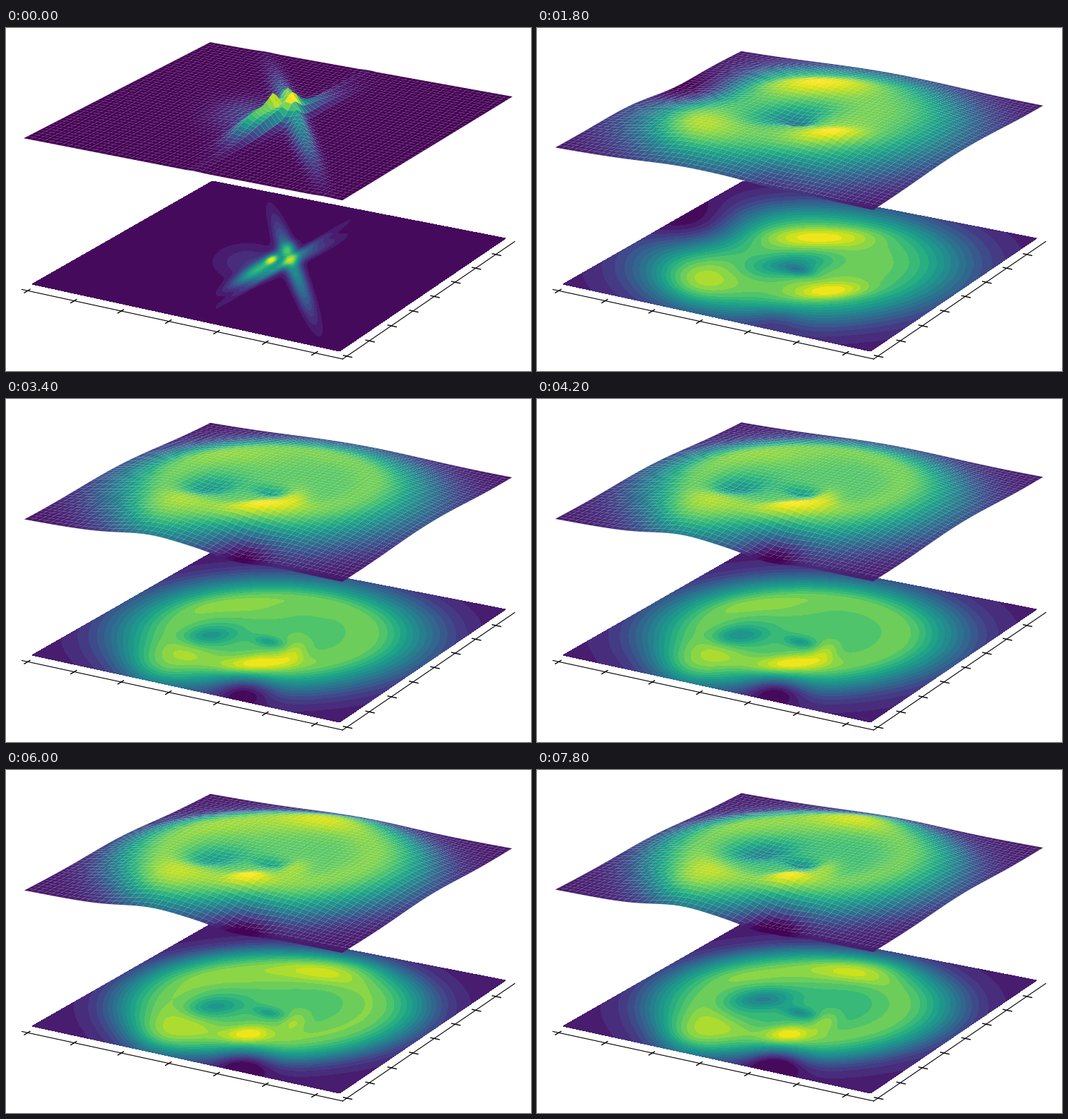
These frames come from a looping animation (743 by 486 pixels, 8000 ms). A matplotlib script:

```python
import numpy as np
import matplotlib.pyplot as plt
from matplotlib.animation import FuncAnimation
from matplotlib.collections import PolyCollection

W, H, DPI = 743, 486, 100
FRAMES, STEP = 40, 200
CELLS = 50          # surface facets per side
FINE = 2            # contour samples per facet
LIFT = 0.17         # surface relief as a share of the gap between planes

# corners in pixels: left, front, right, back
TOP = [(25, 155), (476, 243), (717, 96), (289, 19)]
FLOOR = [(37, 363), (472, 458), (707, 298), (292, 217)]


def project(corners, s, t):
    """Perspective map of the unit square onto four corners."""
    rows, rhs = [], []
    for (u, v), (x, y) in zip([(0, 0), (1, 0), (1, 1), (0, 1)], corners):
        rows.append([u, v, 1, 0, 0, 0, -u * x, -v * x])
        rows.append([0, 0, 0, u, v, 1, -u * y, -v * y])
        rhs += [x, y]
    a, b, c, d, e, f, g, h = np.linalg.solve(np.array(rows, float), rhs)
    w = g * s + h * t + 1
    return np.stack([(a * s + b * t + c) / w, (d * s + e * t + f) / w], -1)


side = np.linspace(0, 1, CELLS * FINE + 1)
S, T = np.meshgrid(side, side, indexing="ij")
R = np.hypot(S - 0.5, T - 0.5)
floor = project(FLOOR, S, T)
X, Y = floor[..., 0], floor[..., 1]
roof = project(TOP, S, T)
up = roof - floor


def bump(cx, cy, rx, ry, angle=0):
    """Gaussian hill, placed in pixels on the lower plane."""
    a = np.radians(angle)
    dx, dy = X - cx, Y - cy
    u = (dx * np.cos(a) + dy * np.sin(a)) / rx
    v = (dy * np.cos(a) - dx * np.sin(a)) / ry
    return np.exp(-u * u - v * v)


def unit(z):
    z = np.maximum(z, 0)
    return (z - z.min()) / (z.max() - z.min())


def ramp(ms, start, end):
    w = np.clip((ms - start) / (end - start), 0, 1)
    return w * w * (3 - 2 * w)


def crossed_ridges():
    """Narrow beams that meet at one hub, over a dim glow."""
    z = 0.42 * bump(408, 342, 68, 11, 69)
    z += 0.28 * bump(400, 331, 68, 8, -25)
    z += 0.16 * bump(391, 335, 105, 4, -33)
    z += 0.45 * bump(358, 340, 42, 8, -32)
    z += 0.50 * bump(376, 328, 9, 5, -30)
    z += 0.20 * bump(399, 312, 10, 9)
    return unit(z + 0.13 * bump(342, 332, 48, 26))


def disc(ms):
    """Round plateau whose rim sharpens while bars and hollows drift."""
    late = ramp(ms, 1600, 3400)
    early = 1 - late
    level = np.interp(ms, [1200, 3400, 5000, 6000, 7800],
                      [0.85, 0.75, 0.6, 0.76, 0.58])
    soft = np.interp(ms, [1200, 6000], [0.085, 0.045])
    z = 0.07 + level / (1 + np.exp((R - 0.43 - 0.015 * late) / soft))
    z += 0.1 * late * np.exp(-((R - 0.29) / 0.07) ** 2)

    # lobe at the near left, dent behind it, pit at the near edge
    z += (0.23 + 0.05 * late) * bump(225 - 8 * late, 360 + 22 * late, 55, 32)
    z -= 0.4 * early * bump(235, 285, 75, 35)
    z -= (0.12 + 0.22 * late) * bump(338, 412, 42, 20)

    # bright bar on the near side, with a hook at its right end
    x = np.interp(ms, [1200, 2600, 3400, 5000, 6000, 7800],
                  [405, 425, 362, 366, 345, 358])
    z += 0.25 * bump(x, 373, 50 - 18 * ramp(ms, 3400, 6000), 11, -4)
    z += 0.14 * late * bump(407, 358, 20, 13, -25)

    # bright arc on the far side, moving left, then right
    z += (0.07 + 0.15 * early) * bump(400 - 60 * late, 296, 75, 13)
    z += 0.15 * ramp(ms, 5000, 6000) * bump(455, 283, 70, 18)

    # large hollow drifting left and back, small one staying put
    x = np.interp(ms, [1200, 3400, 5000, 7800], [385, 288, 282, 320])
    z -= (0.24 + 0.1 * early) * bump(x, 335 - 10 * ramp(ms, 6000, 7800),
                                     42 + 22 * early, 14 + 4 * early, -5)
    z -= 0.2 * bump(372, 344, 22, 8, 10)

    # passing diagonal ridge
    pulse = np.exp(-((ms - 2600) / 500) ** 2)
    z += pulse * (0.24 * bump(382, 352, 40, 8, -30)
                  + 0.16 * bump(448, 300, 26, 14))
    return unit(z)


START = crossed_ridges()


def field(ms):
    w = max(0, 1 - ms / 1200) ** 3
    return unit(w * START + (1 - w) * disc(ms))


def facets(grid):
    """The four corners of every facet, far ones first."""
    g = grid[::FINE, ::FINE]
    quad = np.stack([g[:-1, :-1], g[1:, :-1], g[1:, 1:], g[:-1, 1:]], 2)
    return quad.reshape(CELLS * CELLS, 4, *grid.shape[2:])[order]


ii, jj = np.indices((CELLS, CELLS))
order = np.argsort((ii - 1.1 * jj).ravel(), kind="stable")

fig = plt.figure(figsize=(W / DPI, H / DPI), dpi=DPI, facecolor="white")
ax = fig.add_axes([0, 0, 1, 1])
ax.axis("off")


def draw_axis(start, end, tick_x, half, shift):
    (x0, y0), (x1, y1) = start, end
    ax.plot([x0, x1], [y0, y1], color="black", lw=0.8, zorder=1)
    for x in tick_x:
        y = y0 + (y1 - y0) * (x - x0) / (x1 - x0) + shift
        ax.plot([x - half[0], x + half[0]], [y - half[1], y + half[1]],
                color="black", lw=1, zorder=1)


k = np.arange(8)
draw_axis((22.5, 370.5), (476.5, 469), 30 + 65.4 * k[:7] + 0.4 * k[:7] ** 2,
          (4, -2.4), 0.6)
draw_axis((476.5, 469), (720, 302.5), 483.5 + 32 * k - 0.27 * k ** 2,
          (6, 1.3), 1)

surface = PolyCollection([], linewidths=0, edgecolors="none",
                         antialiaseds=True, zorder=3)
ax.add_collection(surface)
levels = np.linspace(0, 1.0001, 21)
cmap = plt.get_cmap("viridis")
shown = []


def draw(i):
    while shown:
        shown.pop().remove()
    z = field(i * STEP)
    shown.append(ax.contourf(X, Y, z, levels, cmap=cmap, zorder=2))
    lifted = roof + LIFT * (z - z.mean())[..., None] * up
    surface.set_verts(facets(lifted))
    surface.set_facecolor(cmap(unit(facets(z).mean(axis=1))))
    ax.set_xlim(0, W)
    ax.set_ylim(H, 0)
    return [surface]


anim = FuncAnimation(fig, draw, frames=FRAMES, interval=STEP,
                     init_func=lambda: [surface], repeat=True, repeat_delay=0)
plt.show()
```
